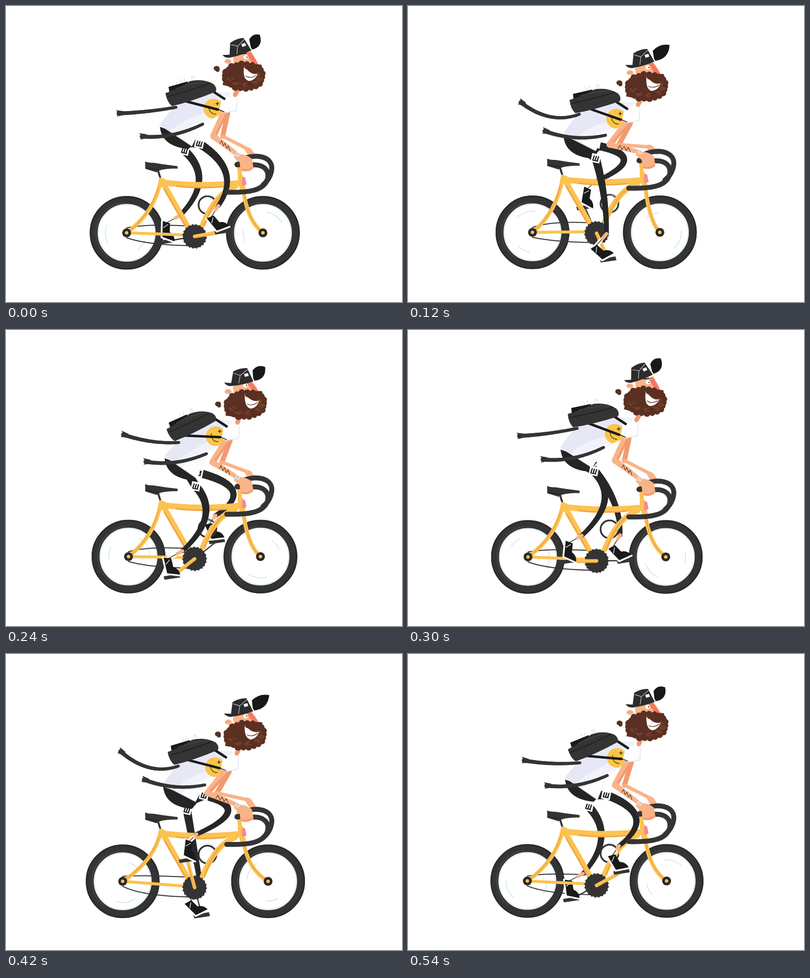
Animation, 800 px wide and 600 px high, one loop 0.57 s. Source, as an HTML page with a canvas:

```html
<!DOCTYPE html>
<html lang="en">
<head>
<meta charset="utf-8">
<title>Cyclist</title>
<style>
html, body { margin: 0; width: 100%; height: 100%; overflow: hidden; background: #fff; }
canvas { display: block; width: 800px; height: 600px; }
</style>
</head>
<body>
<canvas id="stage" width="800" height="600"></canvas>
<script>
const ctx = document.getElementById('stage').getContext('2d');
const LOOP = 570, STEP = 30, TAU = Math.PI * 2, DEG = Math.PI / 180;
const INK = '#353434', BLACK = '#1a1a1a', YELLOW = '#fcc252', AMBER = '#efa744';
const SKIN = '#f9b388', SKIN_SHADE = '#f19a70', BEARD = '#5b3022', BEARD_LIGHT = '#6f3d2b';
const BLUE = '#c3e0f1';
const CRANK = 58, LEG_REACH = 155;

const add = (p, x, y) => [p[0] + x, p[1] + y];
const mix = (a, b, u) => [a[0] + (b[0] - a[0]) * u, a[1] + (b[1] - a[1]) * u];
const polar = (p, r, a) => add(p, r * Math.cos(a), r * Math.sin(a));
const angleTo = (a, b) => Math.atan2(b[1] - a[1], b[0] - a[0]);
const through = (a, m, b) => [2 * m[0] - (a[0] + b[0]) / 2, 2 * m[1] - (a[1] + b[1]) / 2];
const swing = (phase, lag) => Math.cos(phase - lag * DEG);
function turned(origin, x, y, angle) {
  const c = Math.cos(angle), s = Math.sin(angle);
  return add(origin, x * c - y * s, x * s + y * c);
}

// The bike rocks once per crank turn; the rider bobs twice.
function pose(phase) {
  const bob = 2 * phase, rock = Math.sin(phase);
  const wave = (mean, amp, lag) => mean + amp * swing(bob, lag);
  const drop = -11 * Math.cos(bob) - 3 * Math.cos(2 * bob) + 2 * Math.sin(2 * bob);

  const mouth = [wave(494, -3, 60), 150 + drop];
  const neck = [wave(466, -5, 66), 191 + drop];
  const packLow = [wave(334, -6, 62), wave(216, -24, 58)];
  const tailA = add(packLow, 12, 2);
  const tailAEnd = [wave(230, -10, 75), wave(204, 11, -27) + 4 * Math.cos(2 * bob)];
  const tailB = [wave(400, -8, 70), wave(253, -15, 25)];
  const tailBEnd = [tailB[0] - 123, wave(260, 7, -50)];
  return {
    mouth, neck, packLow, tailA, tailAEnd, tailB, tailBEnd,
    tailAMid: add(mix(tailA, tailAEnd, .5), 0, wave(10, -8, 0)),
    tailBMid: add(mix(tailB, tailBEnd, .5), 0, 9),
    rear: [243.7 + 8 * rock, 459.8 - rock],
    front: [519 - 10.5 * rock, 459.8 - rock],
    ring: [381, 467 - 6.5 * rock],
    bar: 1.5 - 8.5 * rock,
    hip: [wave(315, -10, 66), wave(254, -17, 40)],
    hem: [wave(380, -11, 66), wave(293, -18, 60)],
    elbow: [wave(413, 6, -10), wave(273, -9, 0)],
    smiley: add(neck, -45, 31),
    packTip: add(neck, -36, -7),
    headTurn: wave(-1, 7, 62) * DEG,
    capTurn: wave(-11, -7, 66) * DEG,
    capBack: add(mouth, -54, -32),
    visor: add(mouth, wave(29, -10, 29), wave(-75, -10, 75)),
    bun: add(mouth, -67, wave(-1, -17, 60))
  };
}

// The foot follows its pedal; the knee bends by whatever reach is left over.
function legPose(p, phase, side) {
  const pedal = polar(p.ring, CRANK, phase - 10 * DEG);
  const foot = 32 * DEG * swing(phase, 230);
  const thigh = add(p.hem, side + 12 * swing(phase, -55), 2 + 17 * swing(phase, 115));
  const ankle = add(pedal, 9 - 20 * swing(phase, 25), -52);
  const gap = Math.hypot(ankle[0] - thigh[0], ankle[1] - thigh[1]);
  const bend = .42 * Math.sqrt(Math.max(0, LEG_REACH ** 2 - gap ** 2));
  const knee = add(mix(thigh, ankle, .5), bend, -bend * .12);
  return { pedal, foot, thigh, knee, ankle };
}

function fill(color, d) { ctx.fillStyle = color; ctx.fill(new Path2D(d)); }
function stroke(color, width, d) {
  ctx.strokeStyle = color;
  ctx.lineWidth = width;
  ctx.stroke(new Path2D(d));
}
const line = (color, width, ...pts) => stroke(color, width, 'M' + pts.join('L'));
const poly = (color, ...pts) => fill(color, 'M' + pts.join('L') + 'Z');
const curve = (color, width, a, c, b) => stroke(color, width, `M${a}Q${c} ${b}`);
function disc(color, p, r, ry = r) {
  ctx.fillStyle = color;
  ctx.beginPath();
  ctx.ellipse(p[0], p[1], r, ry, 0, 0, TAU);
  ctx.fill();
}
function arc(color, width, p, r, from = 0, to = TAU) {
  ctx.strokeStyle = color;
  ctx.lineWidth = width;
  ctx.beginPath();
  ctx.arc(p[0], p[1], r, from, to);
  ctx.stroke();
}
function place(p, angle, draw) {
  ctx.save();
  ctx.translate(p[0], p[1]);
  ctx.rotate(angle);
  draw();
  ctx.restore();
}
// A curved limb whose width changes along its length.
function taper(color, a, mid, b, w0, w1) {
  const c = through(a, mid, b), n = 24;
  let last = a;
  for (let i = 1; i <= n; i++) {
    const u = i / n, p = mix(mix(a, c, u), mix(c, b, u), u);
    line(color, w0 + (w1 - w0) * u, last, p);
    last = p;
  }
}

function wheel(c, spin) {
  arc(INK, 16, c, 66.5);
  arc('#2b2a2a', 3, c, 73);
  arc('#454343', 2, c, 62, 2.2, 4.6);
  arc(BLUE, 1, c, 57);
  arc(BLUE, 1.3, c, 43, spin + 2.6, spin + 3.5);
  arc(BLUE, 1.3, c, 40, spin + .4, spin + 1);
}
function hub(c) { disc('#2a2929', c, 9); disc(YELLOW, c, 3.5); }

function pedal(p) {
  place(p, -.15, () => poly(INK, [-17, -3], [15, -4], [16, 4], [-16, 4]));
}

function cuff(p) {
  place(p, .2, () => {
    poly('#fff', [-9, -9], [9, -9], [9, 9], [-9, 9]);
    for (let x = -4; x <= 5; x += 4.5) line(BLACK, 2.4, [x, -4], [x - 1, 4]);
    line(BLACK, 2, [-5, 5], [5, 5]);
  });
}

function leg(l, color) {
  taper(color, l.thigh, l.knee, l.ankle, 17, 9);
  cuff(l.thigh);
  const opening = turned(l.pedal, -14, -34, l.foot);
  line(SKIN, 7, l.ankle, mix(l.ankle, opening, .4));
  line('#fff', 9, mix(l.ankle, opening, .5), opening);
  line(INK, 1.5, mix(l.ankle, opening, .4), opening);
  place(l.pedal, l.foot, () => {
    fill(BLACK, 'M-22,-36L-6,-37L0,-20Q12,-18 16,-5L-11,-5Z');
    line('#fff', 3.5, [-23, -36], [-12, -4], [16, -4]);
    stroke('#fff', 1.3, 'M-9,-33L-15,-24');
  });
}

function saddle(y) {
  line(INK, 4, [307, 332 + y], [312, 348 + y]);
  place([281, 315 + y], .04, () => {
    fill(INK, 'M0,-1Q6,2 17,1Q40,4 66,6V11Q45,11 30,16L24,20L1,14Z');
    stroke('#222', 1.5, 'M2,12L28,15');
  });
}

function frame(p) {
  const y = p.bar * .7, seat = [313, 351 + y], bracket = p.ring;
  arc(INK, 3.5, [407, 403 + y * .5], 18);
  stroke(BLUE, 1, 'M405,384Q424,382 424,400');
  saddle(y);

  line(YELLOW, 6, p.rear, [360, bracket[1] - 3]);
  curve(YELLOW, 8, seat, [301, 418], p.rear);
  curve(AMBER, 2, add(seat, -3, 8), [297, 416], add(p.rear, 4, -2));
  line(YELLOW, 11, add(seat, 3, 5), [366, bracket[1] - 22]);
  line(AMBER, 3, add(seat, 7, 20), [362, bracket[1] - 22]);
  curve(YELLOW, 12, [318, 357 + y], [390, 366 + y], [470, 358 + y]);
  curve(AMBER, 3, [345, 364 + y], [390, 370 + y], [442, 365 + y]);
  curve(YELLOW, 11, [464, 364 + y], [424, 378 + y], [397, bracket[1] - 23]);
  curve(AMBER, 3, [442, 377 + y], [420, 390 + y], [401, bracket[1] - 23]);
  poly(YELLOW, add(seat, -4, -5), add(seat, 9, -1), add(seat, 9, 14), add(seat, -5, 16));
  curve(YELLOW, 8, [479, 368 + y], [487, 436], p.front);
  curve(AMBER, 2, [482, 382 + y], [489, 434], add(p.front, -3, -3));
  line(YELLOW, 8, [470, 309 + y], [473, 349 + y]);
  line(YELLOW, 12, [474, 347 + y], [478, 369 + y]);
  poly('#f4889a', [477, 346 + y], [483, 346 + y], [486, 361 + y], [477, 364 + y]);
}

function chain(p) {
  const [x, y] = p.rear, [cx, cy] = p.ring;
  stroke(INK, 2, `M${x},${y - 10}Q${x + 40},${cy - 26} ${cx - 10},${cy - 21}`);
  stroke(INK, 2, `M${x},${y + 10}Q${x + 38},${cy + 17} ${cx - 8},${cy + 19}`);
}

function chainring(c, spin) {
  disc(INK, c, 23.5);
  for (let i = 0; i < 20; i++) disc(INK, polar(c, 23, spin + i * TAU / 20), 2);
}

function handlebar(y) {
  const f = y * 1.2;
  stroke(INK, 10, `M481,${307 + f}C515,${296 + f} 538,${308 + f} 537,${328 + f}Q535,${348 + f} 519,${361 + f}`);
  stroke(INK, 10, `M494,${321 + y}C522,${318 + y} 533,${333 + y} 528,${350 + y}C520,${373 + y} 490,${377 + y} 446,${376 + y}`);
  stroke('#454444', 1.5, `M500,${320 + y}Q528,${322 + y} 525,${350 + y}`);
  line(INK, 11, [467, 320 + y], [476, 319 + y]);
}

function shirt(p) {
  const n = p.neck;
  const shape = new Path2D(`M${p.hip}Q${add(p.packLow, 2, 4)} ${add(p.packLow, 30, -14)}` +
    `L${add(n, -45, -2)}L${n}Q${add(n, 5, 12)} ${add(n, 2, 36)}L${add(n, -25, 40)}` +
    `L${p.tailB}L${p.hem}Z`);
  ctx.fillStyle = '#fdfdff';
  ctx.fill(shape);
  ctx.save();
  ctx.clip(shape);
  const rib = add(p.packLow, 8, 4), chest = add(n, -50, 10);
  curve('#f2f2fa', 80, p.hip, rib, chest);
  curve('#e7e8f5', 48, p.hip, rib, chest);
  disc('#fbc54b', p.smiley, 20);
  arc('#4b3b20', 1.4, add(p.smiley, 4, -2), 13, 1.5, 3.4);
  const eye = add(p.smiley, 8, -10);
  line(BLACK, 1.4, add(eye, -3, 0), add(eye, 3, 0));
  line(BLACK, 1.4, add(eye, 0, -3), add(eye, 0, 3));
  ctx.restore();
  ctx.strokeStyle = '#dfe6f3';
  ctx.lineWidth = .8;
  ctx.stroke(shape);
}

function farArm(p) {
  const y = p.bar * .6, bend = add(p.elbow, 19, 0);
  line(SKIN_SHADE, 10, add(p.neck, -16, 40), bend);
  line(SKIN, 7, bend, [490, 290 + y]);
  fill(SKIN, `M480,${287 + y}Q492,${281 + y} 499,${294 + y}L507,${306 + y}L490,${303 + y}Z`);
}

function nearArm(p) {
  const y = p.bar * .6, wrist = [467, 300 + y], e = p.elbow;
  const top = add(p.neck, -23, 38);
  line(SKIN, 13, top, e);
  line(SKIN_SHADE, 4, add(top, 4, 4), add(e, 5, -3));
  taper(SKIN, e, mix(e, wrist, .5), wrist, 12, 8);
  const tattoo = Array.from({ length: 7 }, (_, i) => add(mix(e, wrist, .28 + i * .07), 0, i % 2 ? -4 : 4));
  line('#5f4436', 1.3, ...tattoo);
  fill(SKIN, `M464,${299 + y}Q485,${298 + y} 497,${309 + y}L500,${328 + y}Q490,${338 + y} 474,${333 + y}L472,${316 + y}L460,${306 + y}Z`);
  stroke(SKIN_SHADE, 3, `M477,${331 + y}Q488,${334 + y} 497,${327 + y}`);
  disc('#fff', [468, 300 + y], 4.5);
  arc('#8b7164', 1, [468, 300 + y], 2.5);
}

function sleeve(n) {
  poly('#fefeff', add(n, -28, 10), add(n, -4, 4), add(n, 3, 16), add(n, 1, 34), add(n, -24, 40), add(n, -33, 34));
  line('#dde3f0', 1, add(n, 2, 14), add(n, 1, 34), add(n, -24, 40));
}

function ribbon(a, mid, end) {
  taper(INK, a, mid, end, 6, 8);
  place(end, angleTo(end, mid), () =>
    poly(INK, [10, -4], [-5, -7], [1, 0], [-4, 6], [10, 4]));
}

function backpack(p) {
  const n = p.neck, a = p.packLow;
  line(BLACK, 5, add(a, 25, -12), add(n, -36, 33));
  line(BLACK, 1.5, add(n, -36, 32), add(n, -23, 38));
  line(BLACK, 5, add(n, -46, -4), add(n, -23, 11));
  place(a, angleTo(a, p.packTip), () => {
    stroke(BLUE, 1.2, 'M38,-37L37,-45M43,-37L46,-45M60,-36V-42H65V-36');
    fill(BLACK, 'M10,-38L50,-36L52,-25L8,-25Z');
    fill(INK, 'M0,-28Q34,-29 55,-35Q82,-32 98,-14Q103,-4 97,2Q45,5 4,1Q-3,-10 0,-28Z');
    stroke('#212121', 2, 'M3,-20Q50,-17 92,-18');
    stroke('#464545', 1.5, 'M24,-30Q58,-30 84,-23');
  });
}

function beard() {
  let seed = 11;
  const random = () => (seed = seed * 16807 % 2147483647) / 2147483647;
  fill(BEARD, 'M462,120L486,117L515,119L521,146L510,163L470,170L438,163L441,148Z');
  for (let i = 0; i < 22; i++) {
    const a = i * TAU / 22, r = .93 + .07 * random();
    disc(BEARD, [480 + 40 * r * Math.cos(a), 144 + 26 * r * Math.sin(a)], 5 + 2.5 * random());
  }
  for (let i = 0; i < 6; i++) {
    const a = -.6 + i * .7;
    disc(BEARD_LIGHT, [482 + 30 * Math.cos(a), 147 + 14 * Math.sin(a)], 7, 4.5);
  }
  stroke('#43231a', 1.5, 'M451,146Q457,157 467,155M485,162Q495,156 503,160');
}

function face() {
  ctx.translate(-492, -137);
  disc(SKIN, [447, 115], 7, 5);
  stroke(SKIN_SHADE, 1.5, 'M442,116Q446,112 451,116');
  fill(SKIN, 'M457,106L492,92Q503,106 509,120L500,130L460,132Z');
  line('#f37865', 9, [490, 99], [504, 120]);
  disc('#fff', [483, 105], 5, 4.5);
  disc(BLACK, [485, 105], 1.2);
  stroke(BLACK, 1.8, 'M474,99L484,97');
  beard();
  fill('#fff', 'M480,122Q477,151 491,153Q504,151 508,138Q493,142 480,122Z');
  stroke(BEARD, 1.3, 'M484,143Q493,149 505,141');
  disc(BEARD, [488, 124], 8, 6);
  disc(BEARD, [501, 130], 9, 7);
}

function cap(p) {
  const low = turned(p.capBack, 59, -1, p.capTurn), high = turned(p.capBack, 60, -22, p.capTurn);
  const tip = p.visor;
  const bulge = (a, b, k) => polar(mix(a, b, .5), k, angleTo(a, b) + TAU / 4);
  fill('#171819', `M${low}Q${bulge(low, tip, 19)} ${tip}Q${bulge(tip, high, 10)} ${high}Z`);
  place(p.capBack, p.capTurn, () => {
    fill('#2c2c2d', 'M0,-5L14,-2L21,-25Q36,-31 50,-28L59,0Q36,5 12,4Q3,2 0,-5Z');
    stroke('#fff', 2, 'M51,-28L60,-1');
    stroke('#c9c9c9', 1.2, 'M22,-21L34,-15L50,-25M34,-15L29,0');
    poly('#fff', [42, -17], [50, -18], [51, -12], [43, -11]);
  });
}

function head(p) {
  line(SKIN_SHADE, 9, add(p.neck, -1, 3), add(p.mouth, -24, 34));
  disc(BEARD, p.bun, 6, 5);
  disc(BEARD, add(p.bun, 2, 3), 4);
  place(p.mouth, p.headTurn, face);
  cap(p);
}

function draw(phase) {
  const p = pose(phase);
  const near = legPose(p, phase, 8), far = legPose(p, phase + Math.PI, -8);
  const crank = angleTo(p.ring, near.pedal);
  ctx.fillStyle = '#fff';
  ctx.fillRect(0, 0, 800, 600);

  wheel(p.rear, phase);
  wheel(p.front, phase + 2.3);
  chain(p);
  line(INK, 2.5, p.ring, far.pedal);
  pedal(far.pedal);
  leg(far, '#292929');
  frame(p);
  hub(p.rear);
  hub(p.front);
  chainring(p.ring, crank);
  line(YELLOW, 7, p.ring, polar(p.ring, 53, crank));
  line(AMBER, 2, add(p.ring, 0, 3), polar(add(p.ring, 0, 3), 50, crank));
  pedal(near.pedal);

  const h = p.hip;
  fill('#242424', `M${add(h, 0, 4)}Q${add(h, 4, 44)} ${add(h, 58, 49)}L${add(h, 74, 30)}Z`);
  line('#242424', 17, add(h, 48, 36), near.thigh);
  farArm(p);
  shirt(p);
  leg(near, '#272727');
  handlebar(p.bar);
  nearArm(p);
  sleeve(p.neck);
  ribbon(p.tailA, p.tailAMid, p.tailAEnd);
  ribbon(p.tailB, p.tailBMid, p.tailBEnd);
  backpack(p);
  head(p);
}

ctx.lineCap = 'round';
ctx.lineJoin = 'round';
const start = performance.now();
function tick() {
  const t = (performance.now() - start) % LOOP;
  draw(Math.floor(t / STEP) * STEP / LOOP * TAU);
  requestAnimationFrame(tick);
}
tick();
</script>
</body>
</html>
```
